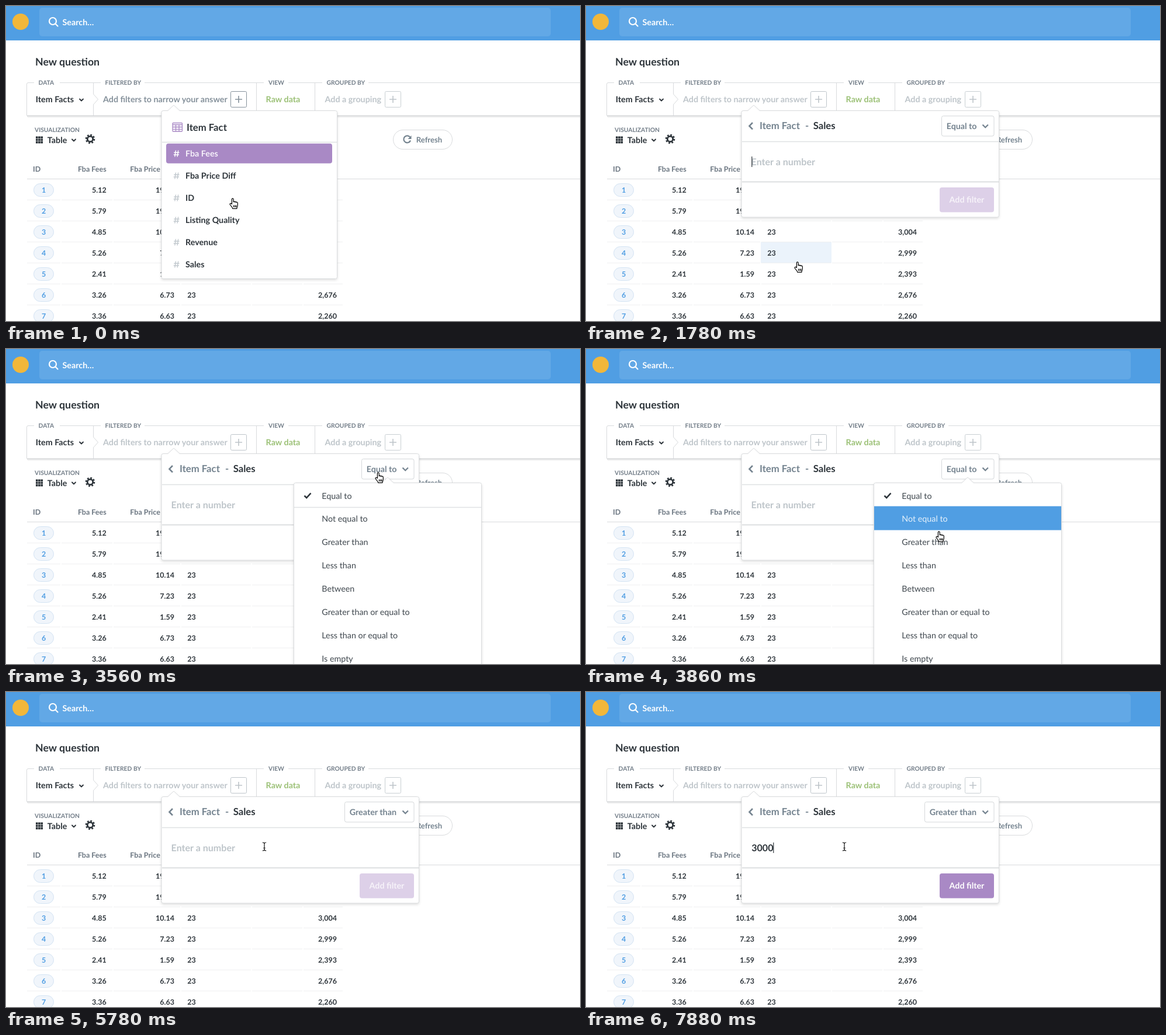
Animation of 982 by 540 pixels, one loop 8000 ms. Source, as an HTML page:

```html
<!DOCTYPE html>
<html lang="en">
<head>
<meta charset="utf-8">
<title>New question</title>
<style>
  html, body { margin: 0; width: 100%; height: 100%; overflow: hidden; background: #fff; }
  svg { display: block; width: 982px; height: 540px; }
  text { font: 700 14.3px Lato, sans-serif; fill: #2e353b; text-rendering: geometricPrecision; white-space: pre; }
  .label { font-size: 10.3px; fill: #727d88; }
  .cell { font-size: 12.5px; }
  .head { fill: #6a7580; }
  .mid { fill: #74838f; }
  .pale { fill: #bec5ca; }
  .big { font-size: 16.7px; }
  .input { font-size: 16.07px; }
  .end { text-anchor: end; }
  .center { text-anchor: middle; }
  .op { font-weight: 400; fill: #3f474e; }
  .line { fill: none; stroke: #d9dbdd; }
  .icon { fill: none; stroke: #2e353b; stroke-width: 1.9; stroke-linecap: round; stroke-linejoin: round; }
  .pop { fill: #fff; stroke: #dadcde; filter: drop-shadow(0 2px 2px rgba(0, 0, 0, .13)); }
</style>
</head>
<body>
<svg viewBox="0 0 982 540" xmlns="http://www.w3.org/2000/svg">
  <rect width="982" height="540" fill="#fff"/>

  <!-- top bar -->
  <rect width="982" height="59" fill="#509ee3"/>
  <rect x="57" y="3" width="875" height="49" rx="5" fill="#62a8e6"/>
  <circle cx="25" cy="27" r="14" fill="#f2b73a"/>
  <g fill="none" stroke="#fff" stroke-width="2.2" stroke-linecap="round">
    <circle cx="80" cy="26" r="6"/><path d="M84.5 30.5l4 4"/>
  </g>
  <text x="96.5" y="33" style="fill:#fff">Search…</text>

  <text x="50" y="102" style="font-size:17.8px">New question</text>

  <!-- query bar -->
  <path d="M36 188.5H982" stroke="#d3d5d7" stroke-width="2"/>
  <path d="M37 190.5H982" stroke="#f1f2f2" stroke-width="2"/>
  <path class="line" d="M48 131.5H38q-2.500 0-2.500 2.500V188M92 131.5H162M237 131.5H441M483 131.5H541M620 131.5H982
    M149.500 131.500V151l8 9-8 9V188M428.500 132V188M528.500 132V188"/>
  <text class="label" x="55.600" y="135">DATA</text>
  <text class="label" x="169.600" y="135">FILTERED BY</text>
  <text class="label" x="449" y="135">VIEW</text>
  <text class="label" x="548.500" y="135">GROUPED BY</text>
  <text x="50.800" y="165">Item Facts</text>
  <path class="icon" d="M126 159.500l3 3 3-3"/>
  <g id="prompt">
    <text x="166" y="165" style="fill:currentColor">Add filters to narrow your answer</text>
    <rect x="384.500" y="146.500" width="27" height="27" rx="2" fill="none" stroke="currentColor"/>
    <path d="M392 160H404M398 154V166" stroke="currentColor" stroke-width="1.600"/>
  </g>
  <text x="444.600" y="165" style="fill:#9cc177">Raw data</text>
  <text class="pale" x="545.500" y="165">Add a grouping</text>
  <rect x="648.500" y="146.500" width="27" height="27" rx="2" fill="none" stroke="#c9cfd3"/>
  <path d="M656 160H668M662 154V166" stroke="#bec5ca" stroke-width="1.600"/>

  <!-- visualization row -->
  <text class="label" x="49" y="216">VISUALIZATION</text>
  <g id="grid" fill="#2e353b"></g>
  <text x="70.800" y="235">Table</text>
  <path class="icon" d="M113 228.500l3 3 3-3"/>
  <g transform="translate(144 228)" fill="none" stroke="#2e353b">
    <circle r="4.700" stroke-width="2.800"/>
    <circle r="7" stroke-width="2.600" stroke-dasharray="2.900 2.598"/>
  </g>
  <rect x="662.500" y="212.500" width="101" height="33" rx="16.500" fill="#fff" stroke="#d9dbdd"/>
  <path d="M691 224.500a6 6 0 1 0 1 6" fill="none" stroke="#74838f" stroke-width="2.200"/>
  <path d="M693.500 222v6h-6z" fill="#74838f"/>
  <text class="mid" x="701.800" y="234" style="font-size:13.100px">Refresh</text>

  <!-- results -->
  <rect id="hoverCell" x="299" width="121" height="36" fill="#ebf3fb"/>
  <text class="cell head" x="46" y="284">ID</text>
  <text class="cell head end" x="171.700" y="284">Fba Fees</text>
  <text class="cell head end" x="288" y="284">Fba Price Diff</text>
  <path class="line" d="M36 296.500H982"/>
  <g id="rows"></g>

  <!-- field picker -->
  <g id="picker">
    <path class="pop" data-box="266 179.500 300.500 288 287"/>
    <g fill="none" stroke="#a989c5" stroke-width="1.300">
      <rect x="285" y="200.500" width="16.500" height="14.500" rx="1"/>
      <path d="M285 203.500H301.500M285 207.500H301.500M285 211.300H301.500M290.500 203V215M296 203V215"/>
    </g>
    <text class="big" x="309" y="213.500">Item Fact</text>
    <path d="M267 233.500H566" stroke="#dfe1e3" stroke-width="1.500"/>
    <rect id="pickHover" x="274" width="284" height="34" rx="4" fill="#a989c5"/>
    <g id="fields"></g>
  </g>

  <!-- filter form -->
  <g id="form">
    <path class="pop" data-box="266 179.500 440.500 182.500 287"/>
    <path d="M285 200l-5.500 5.700 5.500 5.700" fill="none" stroke="#74838f" stroke-width="2.600"/>
    <text class="big mid" x="297" y="211">Item Fact</text>
    <text class="big mid" x="375" y="211">-</text>
    <text class="big" x="388.700" y="211">Sales</text>
    <rect id="opBox" y="188.500" height="34.500" rx="3" fill="#fff" stroke="#d5d8da"/>
    <text id="opText" class="mid" y="210.500"></text>
    <path d="M678.500 203.500l4.700 4.700 4.700-4.700" fill="none" stroke="#74838f" stroke-width="2.300"/>
    <path d="M267 232.500H706" stroke="#dfe1e3" stroke-width="1.500"/>
    <path d="M267 301.500H706" stroke="#d3d5d7" stroke-width="1.700"/>
    <text id="value" class="input" y="272.500"></text>
    <rect id="caret" y="258" width="1.200" height="18" fill="#2e353b"/>
    <rect id="submit" x="605" y="311" width="93" height="42.500" rx="4"/>
    <text class="center" id="submitText" x="651.500" y="337">Add filter</text>
  </g>

  <!-- operator menu -->
  <g id="menu">
    <path class="pop" data-box="492.500 229.500 321 330 653"/>
    <path d="M493 271.500H813" stroke="#e0e2e4" stroke-width="1.500"/>
    <path d="M510.500 251.500l3.700 3.700 7.300-8" fill="none" stroke="#2e353b" stroke-width="2.500"/>
    <rect id="menuHover" x="493" width="320" height="41" fill="#509ee3"/>
    <g id="ops"></g>
  </g>

  <g id="cursor" stroke-linejoin="round">
    <path id="hand" fill="#fff" stroke="#000" stroke-width="1.200" d="M-1.600 8.500V1.300a1.400 1.400 0 0 1 2.800 0V6c.2-1.400 2.500-1.200 2.500.3.200-1.200 2.400-1 2.400.5.200-1 2.200-.8 2.200.8V11c0 3-1.400 3.500-1.400 6.300H-.3C-.3 15-2.800 13.500-4.700 10.500c-1-1.600 1.200-3.500 3.100-.9zM1.500 11.500v3.500M3.700 11.500v3.500M5.700 11.500v3.500"/>
    <path id="arrow" fill="#000" stroke="#fff" d="M0 0V15l3.500-3.200 2.300 5.200 2.400-1-2.200-5H11z"/>
    <path id="beam" fill="none" stroke="#111" stroke-width="1.200" d="M-3.200-7Q0-7 0-5Q0-7 3.200-7M0-5.500V5.500M-3.200 7Q0 7 0 5Q0 7 3.200 7M-1.700 2.500H1.700"/>
  </g>
</svg>

<script>
const LOOP = 8000, DIGIT = 9.32;
const $ = id => document.getElementById(id);
const show = (id, on) => { $(id).style.display = on ? '' : 'none'; };
const set = (id, attrs) => { for (const k in attrs) $(id).setAttribute(k, attrs[k]); };
const text = (x, y, cls, s) => `<text x="${x}" y="${y}" class="${cls}">${s}</text>`;

// Rounded panel with a small arrow on its top edge.
document.querySelectorAll('[data-box]').forEach(p => {
  const [x, y, w, h, tip] = p.dataset.box.split(' ').map(Number);
  p.setAttribute('d', `M${x + 3} ${y}H${tip - 10}l10-9.500 10 9.500H${x + w - 3}q3 0 3 3v${h - 6}q0 3-3 3H${x + 3}q-3 0-3-3V${y + 3}q0-3 3-3z`);
});

for (let i = 0; i < 9; i++)
  $('grid').innerHTML += `<rect x="${51 + i % 3 * 4.2}" y="${223.5 + (i / 3 | 0) * 4.2}" width="3.600" height="3.600"/>`;

const rows = [
  ['5.12', '19.14'], ['5.79', '19.23'], ['4.85', '10.14', '3,004'], ['5.26', '7.23', '2,999'],
  ['2.41', '1.59', '2,393'], ['3.26', '6.73', '2,676'], ['3.36', '6.63', '2,260']
];
$('rows').innerHTML = rows.map(([fees, diff, sales = ''], i) => {
  const y = 320 + i * 36;
  return `<rect x="47.500" y="${y - 15.5}" width="34" height="22" rx="11" fill="#f0f5fb" stroke="#d3e3f3"/>`
    + `<text x="64.500" y="${y}" class="cell center" style="fill:#509ee3">${i + 1}</text>`
    + text(171.7, y, 'cell end', fees) + text(288, y, 'cell end', diff)
    + (sales && text(310.3, y, 'cell', '23') + text(566, y, 'cell end', sales))
    + `<path d="M36 ${y + 12.5}H93m2 0H182m2 0H298m2 0H419m2 0H507m2 0H576" stroke="#eff0f1"/>`;
}).join('');

const fields = ['Fba Fees', 'Fba Price Diff', 'ID', 'Listing Quality', 'Revenue', 'Sales'];
$('fields').innerHTML = fields.map((name, i) =>
  `<g transform="translate(0 ${i * 38})"><path d="M290.500 247.500l-1.700 11M294.700 247.500l-1.700 11M287.300 251.200h9.200M286.700 255h9.200" fill="none" stroke="#c3cacf" stroke-width="1.500"/>`
  + text(307, 258, '', name) + '</g>').join('');

const ops = ['Equal to', 'Not equal to', 'Greater than', 'Less than', 'Between',
  'Greater than or equal to', 'Less than or equal to', 'Is empty'];
$('ops').innerHTML = ops.map((name, i) => text(540.3, i ? 255.5 + i * 40 : 256.5, 'op', name)).join('');

// Each track holds [start time, ...values]; a value stays until the next start.
const pointer = [
  [0, 388, 330, 'hand'], [150, 384, 344, 'hand'], [300, 376, 377, 'hand'], [440, 368, 411, 'hand'],
  [590, 363, 433, 'hand'], [740, 362, 439, 'hand'],
  [2080, 368, 433, 'hand'], [2230, 392, 402, 'hand'], [2370, 440, 350, 'arrow'], [2520, 510, 285, 'beam'],
  [2670, 575, 227, 'arrow'], [2820, 620, 203, 'hand'], [2960, 635, 195, 'hand'], [3110, 637, 202, 'hand'],
  [3410, 637, 208, 'hand'], [3560, 637, 212, 'hand'], [3710, 624, 250, 'hand'], [3860, 604, 313, 'hand'],
  [4000, 592, 326, 'hand'],
  [4600, 578, 319, 'arrow'], [4740, 540, 304, 'arrow'], [4890, 495, 283, 'beam'],
  [5040, 462, 271, 'beam'], [5190, 446, 266, 'beam'], [5340, 442, 265, 'beam']
];
const pick = [[0, 0], [150, 2], [300, 3], [440, 4], [590, 5]];
const option = [[0, -1], [3710, 0], [3860, 1], [4000, 2]];
const caret = [[0, 0], [1640, 1], [2230, 0], [2820, 1], [3260, 0], [5340, 1], [5780, 0], [6380, 1], [6830, 0], [7280, 1]];
const typed = [[0, ''], [7280, '3'], [7430, '30'], [7580, '300'], [7880, '3000']];
const prompt = [[0, '#85919b'], [150, '#a3acb4'], [300, '#bec5ca']];
const at = (track, t) => track.findLast(k => k[0] <= t).slice(1);

function draw(t) {
  const [x, y, kind] = at(pointer, t);
  set('cursor', { transform: `translate(${x} ${y})` });
  for (const k of ['hand', 'arrow', 'beam']) show(k, k === kind);

  $('prompt').style.color = at(prompt, t)[0];

  const picking = t < 1640, open = t >= 3260 && t < 4450;
  show('picker', picking);
  show('form', !picking);
  show('menu', open);

  const [field] = at(pick, t);
  set('pickHover', { y: 235.7 + field * 38 });
  [...$('fields').children].forEach((g, i) => {
    g.firstChild.style.stroke = i === field ? '#fff' : '';
    g.lastChild.style.fill = i === field ? '#f6f1fa' : '';
  });

  const row = Math.floor((y - 296.5) / 36);
  show('hoverCell', t >= 1780 && y > 362);
  set('hoverCell', { y: 296.5 + row * 36 });

  const greater = t >= 4450, left = greater ? 579.5 : 608.5;
  set('opBox', { x: left, width: 698 - left });
  set('opText', { x: left + 8.2 });
  $('opText').textContent = ops[greater ? 2 : 0];

  const [value] = at(typed, t);
  $('value').textContent = value || 'Enter a number';
  set('value', { x: value ? 283.2 : 282.6, class: value ? 'input' : 'input pale' });
  set('caret', { x: 283.2 + value.length * DIGIT - (value ? .3 : 0) });
  show('caret', at(caret, t)[0]);
  set('submit', { fill: value ? '#a989c5' : '#ddd0e8' });
  $('submitText').style.fill = value ? '#fff' : '#f6f2f9';

  const [op] = at(option, t);
  show('menuHover', op >= 0);
  set('menuHover', { y: op > 0 ? 229.5 + op * 40 : 230, height: 41 });
  [...$('ops').children].forEach((el, i) => { el.style.fill = i === op ? '#e6f1fb' : ''; });
}

function tick() {
  draw(performance.now() % LOOP);
  requestAnimationFrame(tick);
}
tick();
</script>
</body>
</html>
```
